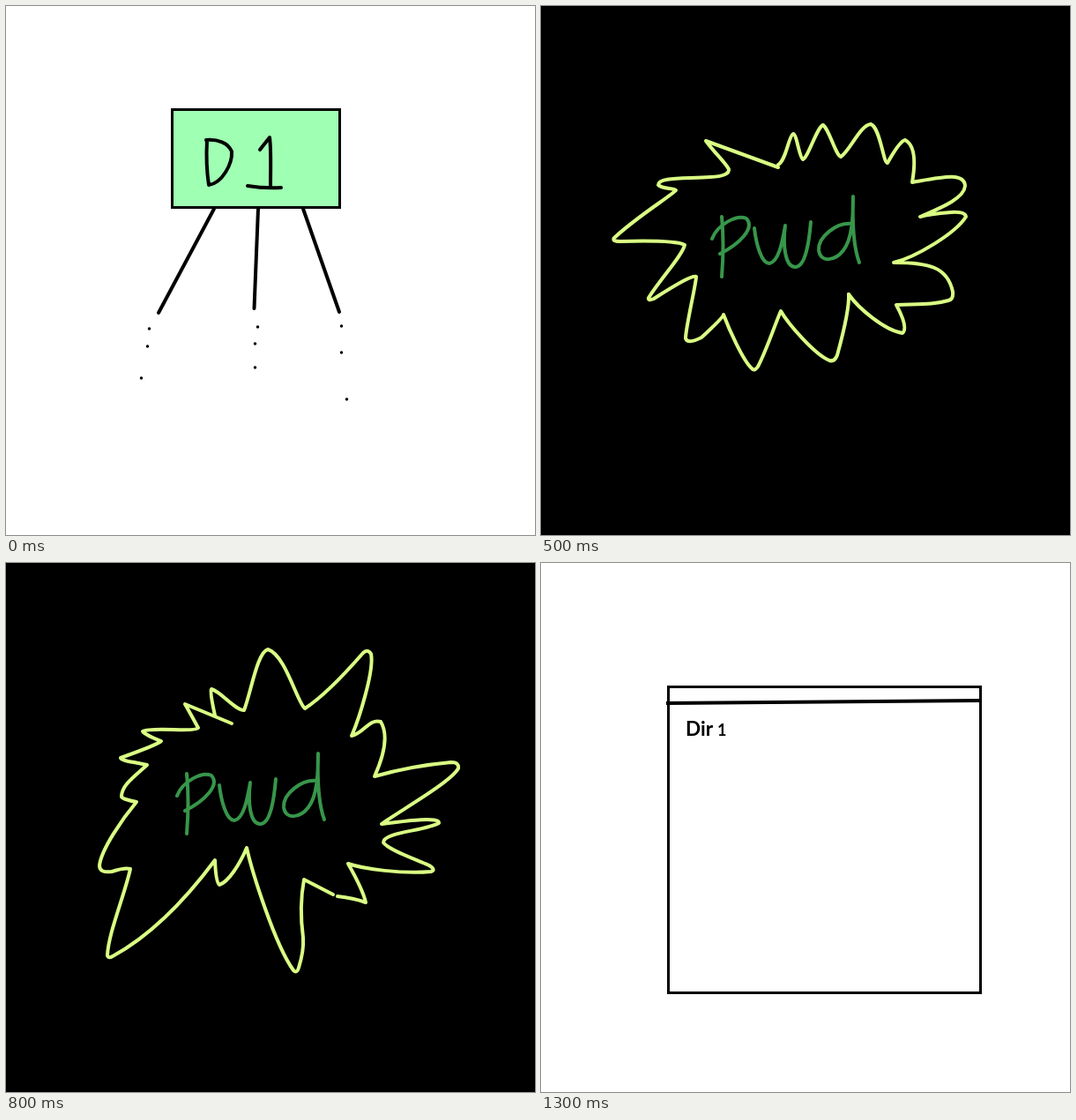
An HTML page for the animation above (2.3 s loop, 600 px wide and 600 px high).

```html
<!DOCTYPE html>
<html lang="en">
<head>
<meta charset="utf-8">
<title>pwd</title>
<style>
  html, body { margin: 0; height: 100%; overflow: hidden; background: #fff; }
  svg { display: block; width: 100vw; height: 100vh; }
  path, rect { fill: none; stroke: #000; stroke-linecap: round; stroke-linejoin: round; }
  .box { stroke-width: 3; stroke-linejoin: miter; }
  .line { stroke-width: 4; }
  .thin { stroke-width: 2; }
  .burst path { stroke: #daff84; stroke-width: 4; }
  .word { stroke: #37964a; stroke-width: 4; }
  .bar { stroke-width: 4; stroke-linecap: butt; }
  .scene { opacity: 0; animation: 2300ms step-end infinite; }
  .tree { animation-name: tree; }
  .shout { animation-name: shout; }
  .wide { animation-name: wide; }
  .tall { animation-name: tall; }
  .computer { animation-name: computer; shape-rendering: crispEdges; }
  .window { animation-name: window; }

  @keyframes tree { 0% { opacity: 1 } 8.695%, 100% { opacity: 0 } }
  @keyframes shout { 0% { opacity: 0 } 8.695% { opacity: 1 } 43.478%, 100% { opacity: 0 } }
  @keyframes wide {
    0%, 21.739%, 30.434% { opacity: 1 }
    17.391%, 26.086%, 34.782%, 100% { opacity: 0 }
  }
  @keyframes tall {
    0%, 21.739%, 30.434% { opacity: 0 }
    17.391%, 26.086%, 34.782%, 100% { opacity: 1 }
  }
  @keyframes computer {
    0% { opacity: 0; transform: none }
    43.478% { opacity: 1; transform: none }
    52.173% { opacity: 1; transform: translate(-118px, -87px) scale(1.43) }
    56.521%, 100% { opacity: 0; transform: none }
  }
  @keyframes window { 0% { opacity: 0 } 56.521%, 100% { opacity: 1 } }
</style>
</head>
<body>
<svg viewBox="0 0 600 600">
  <g class="scene tree">
    <rect class="box" x="188.5" y="117.5" width="190" height="111" style="fill:#9fffb3"/>
    <path class="line" d="M228 152 C227 170 228 190 230 203 C245 201 257 179 256 165 C252 155 240 151 227 152"/>
    <path class="line" d="M288 163 L299 149 C301 165 300 185 300 204 M274 204 Q292 207 312 206"/>
    <path class="line" d="M236 230 L173 348 M286 230 L281.5 343 M337 230 L378 347"/>
    <path style="stroke-width:3.5" d="M162.5 366h0M160.5 386h0M153.5 422h0M285.5 364h0M282.5 383h0M282.5 410h0M380.5 363h0M380.5 393h0M386.5 446h0"/>
  </g>

  <g class="scene shout">
    <rect width="600" height="600" style="fill:#000;stroke:none"/>
    <g class="scene wide burst">
      <path d="M269 183 L187 153 C198 168 207 175 213 185 Q214 193 192 194 C160 196 133 194 133 203 C138 208 150 206 153 209 C148 215 110 238 83 263 Q80 267 90 267 C125 266 155 267 163 271 C161 282 135 310 122 331 Q121 335 128 332 Q173 303 176 307 C176 315 164 365 164 377 Q166 384 182 376 Q207 353 207 350 C213 366 229 402 239 411 Q242 415 246 409 C256 390 265 362 272 346 C280 360 310 395 327 402 Q333 404 336 396 Q350 345 349 327"/>
      <path d="M349 327 C360 343 390 368 410 371 Q417 365 403 339 C430 338 445 339 462 334 Q468 333 467 324 C461 296 440 291 400 291 C425 285 470 258 482 239 Q481 233 465 234 Q440 236 430 239 C445 232 480 220 481 204 C480 188 455 194 421 200 Q428 160 413 152 Q407 153 393 178 C388 178 385 138 374 134 C362 135 350 165 340 171 C334 169 327 140 320 135 C313 137 303 172 297 174 C293 172 290 145 286 145 C281 147 278 175 269 180"/>
    </g>
    <g class="scene tall burst">
      <path d="M256 182 L203 160 Q211 174 218 187 Q216 190 190 189 Q160 188 155 191 Q158 195 176 202 Q172 206 130 221 Q130 224 145 226 L160 229 C146 242 131 252 131 265 Q132 268 148 271 C132 290 108 325 106 343 Q106 352 120 350 Q135 345 141 347 C135 375 116 420 115 445 Q116 449 121 446 C165 422 205 380 237 337 Q238 362 242 365 C252 362 265 342 273 323 C279 350 305 433 326 462 Q330 466 332 459 Q338 440 337 425 C333 395 335 375 338 359 L371 376"/>
      <path d="M376 378 Q394 380 408 385 Q405 371 388 341 C405 347 450 353 482 350 Q488 348 480 343 C462 335 433 325 428 317 C428 305 475 304 491 295 C492 287 450 293 426 296 C445 282 504 249 513 233 Q514 226 505 226 Q460 230 418 242 Q437 200 425 180 C412 176 405 194 392 196 C400 178 418 122 414 103 Q410 97 405 102 C385 125 362 150 339 165 C330 158 317 104 297 98 C285 101 278 146 270 167 C260 167 244 146 233 143 Q231 146 237 173"/>
    </g>
    <path class="word" d="M205 239 Q208 270 205 307 M194 264 C200 248 222 236 233 241 C243 252 225 270 203 281"/>
    <path class="word" d="M242 252 C244 270 250 292 259 292 C270 290 274 266 277 249 C274 272 277 297 289 296 C300 295 304 268 306 245"/>
    <path class="word" d="M353 247 C335 245 314 262 315 277 C317 292 334 289 343 277 C353 264 354 240 354 216 C353 245 355 275 361 291"/>
  </g>

  <g class="scene computer">
    <rect class="box" x="203.5" y="159.5" width="232" height="221"/>
    <rect class="box" x="225.5" y="184.5" width="189" height="172"/>
    <rect class="box" x="257.5" y="216.5" width="125" height="112"/>
    <path class="bar" d="M256 232 L380 230"/>
    <path style="stroke-width:1" d="M267 250 L270 258 L272 252 Q277 249 280 255 Q281 251 286 250"/>
    <path class="thin" d="M273 382 C250 394 231 400 226 413 C222 426 226 440 216 444 L183 445"/>
    <path class="thin" d="M183 444 Q172 442 164 455 C157 466 152 483 153 495 Q154 508 162 514 Q178 517 193 514 L208 505 V478 Q201 458 189 450 L180 444 M183 448 L178 469 M159 472 Q180 468 197 473"/>
    <path class="thin" d="M300 379 C304 405 302 430 285 456 M285 448 V457 M336 382 C326 402 324 420 328 434 Q334 442 342 460"/>
    <path class="thin" d="M298 425 Q270 427 251 431 L254 436 L255 486 H320 L382 485 M380 486 Q378 455 381 424 M328 425 L385 425"/>
  </g>

  <g class="scene window">
    <rect class="box" x="144.5" y="140.5" width="354" height="347"/>
    <path class="bar" d="M142 159 L498 156"/>
    <text x="164" y="196" font-family="Lato, 'Open Sans', sans-serif" font-weight="700" font-size="22.5">Dir <tspan font-size="18">1</tspan></text>
  </g>
</svg>
</body>
</html>
```
